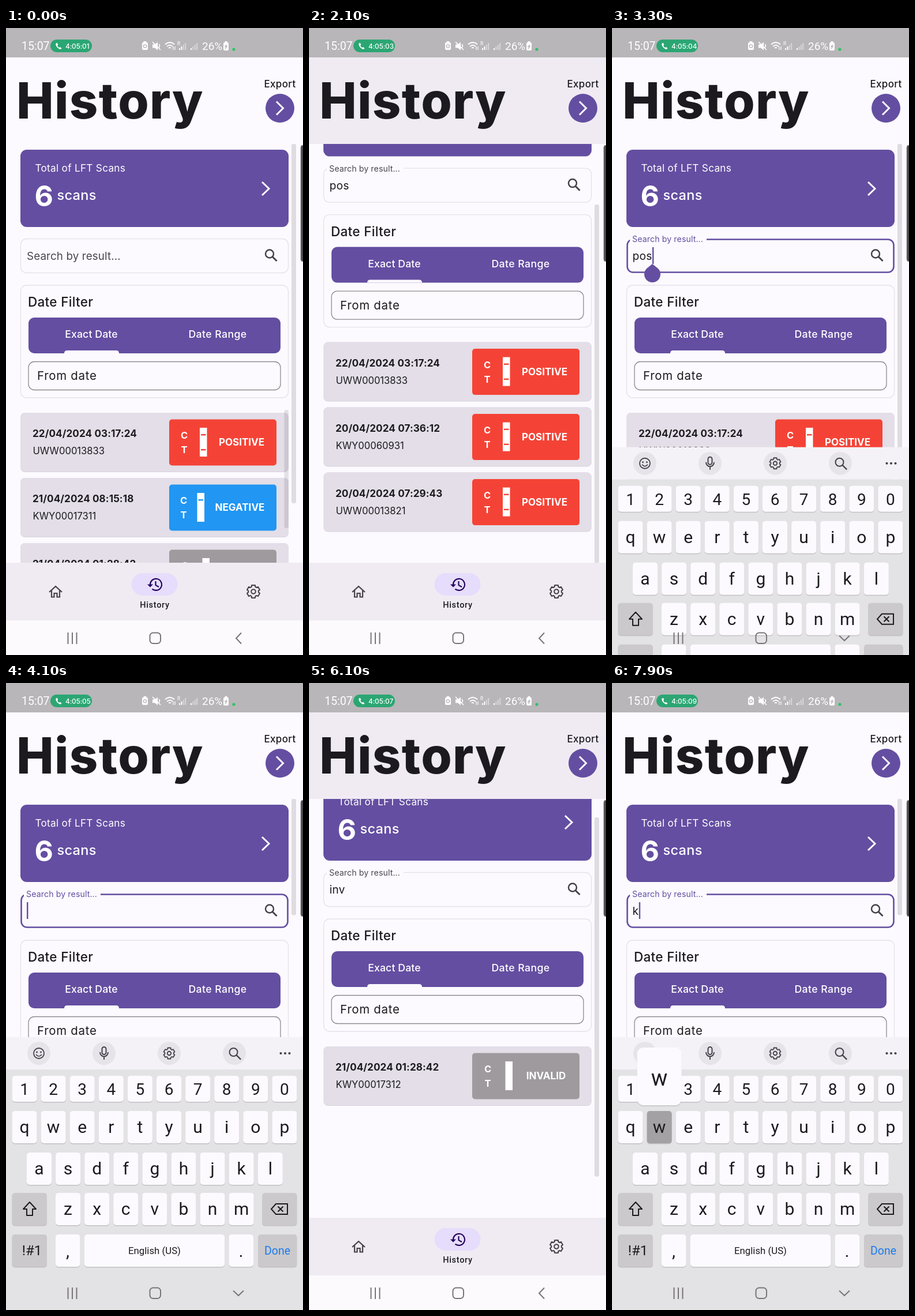
Recreate the animation shown at these times as an HTML page. Size 515 px wide and 1087 px high, loop 8 s.

```html
<!DOCTYPE html>
<html lang="en">
<head>
<meta charset="utf-8">
<title>Scan history</title>
<style>
html, body { margin: 0; width: 100%; height: 100%; overflow: hidden; background: #fdfaff; }
svg { display: block; width: 100vw; height: 100vh; }
text { font-family: Inter, "Open Sans", sans-serif; fill: #1c1a1f; white-space: pre; }
.rb { font-family: Roboto, Arial, sans-serif; }
.m { text-anchor: middle; }
.w { fill: #fff; }
.b { font-weight: 700; }
.med { font-weight: 500; }
.ln { fill: none; stroke-linecap: butt; stroke-linejoin: miter; }
</style>
</head>
<body>
<svg id="stage" viewBox="0 0 515 1087" preserveAspectRatio="none"></svg>
<script>
const LOOP = 8000, PURPLE = '#644ea1', BG = '#fdfaff', INK = '#45414a';
const KB_TOP = 614, KB_TRAVEL = 473, VIEW_TOP = 201, VIEW_END = 927, CONTENT = 846;

// markup helpers
const rect = (x, y, w, h, r, fill, extra = '') =>
  `<rect x="${x}" y="${y}" width="${w}" height="${h}" rx="${r}" fill="${fill}" ${extra}/>`;
const circle = (x, y, r, fill, extra = '') => `<circle cx="${x}" cy="${y}" r="${r}" fill="${fill}" ${extra}/>`;
const line = (d, color, w, extra = '') => `<path class="ln" d="${d}" stroke="${color}" stroke-width="${w}" ${extra}/>`;
const text = (s, x, y, size, cls = '', ls = 0, extra = '') =>
  `<text x="${x}" y="${y}" font-size="${size}" letter-spacing="${ls}" class="${cls}" ${extra}>${s}</text>`;

function gear(cx, cy, r, w) {
  const pts = [];
  for (let i = 0; i < 6; i++) {
    for (const [da, k] of [[-15, 1], [15, 1], [22, .78], [38, .78]]) {
      const a = (i * 60 - 90 + da) * Math.PI / 180;
      pts.push((cx + r * k * Math.cos(a)).toFixed(1) + ' ' + (cy + r * k * Math.sin(a)).toFixed(1));
    }
  }
  return line('M' + pts.join('L') + 'Z', INK, w, 'style="stroke-linejoin:round"') +
    circle(cx, cy, r * .33, 'none', `stroke="${INK}" stroke-width="${w}"`);
}

const magnifier = (x, y, r, w) => circle(x, y, r, 'none', `stroke="${INK}" stroke-width="${w}"`) +
  line(`M${x + r * .7} ${y + r * .7}L${x + r * 1.8} ${y + r * 1.8}`, INK, w * 1.15);

// result cards
const KINDS = {
  POSITIVE: { fill: '#f44336', strip: 336, c: 309, label: 408.5, marks: [704, 730] },
  NEGATIVE: { fill: '#2196f3', strip: 331.5, c: 308, label: 405.5, marks: [704] },
  INVALID: { fill: '#9e9a9e', strip: 340.5, c: 310, label: 411, marks: [] }
};
const SCANS = [
  ['22/04/2024 03:17:24', 'UWW00013833', 'POSITIVE'],
  ['21/04/2024 08:15:18', 'KWY00017311', 'NEGATIVE'],
  ['21/04/2024 01:28:42', 'KWY00017312', 'INVALID'],
  ['20/04/2024 07:36:12', 'KWY00060931', 'POSITIVE'],
  ['20/04/2024 07:29:43', 'UWW00013821', 'POSITIVE']
];

// every card is drawn in the first slot and moved down to its row later
function card([date, id, kind]) {
  const k = KINDS[kind];
  return '<g class="card">' +
    rect(25, 667, 465, 103, 8, '#d8d3dc') + rect(25, 667, 465, 102, 8, '#e3dee7') +
    text(date, 46, 709, 17.1, 'b', .1) + text(id, 46.5, 739, 16.6) +
    rect(283, 678.5, 186, 80, 5, k.fill) +
    text('C', k.c, 712, 16.5, 'b w m') + text('T', k.c, 737, 16.5, 'b w m') +
    rect(k.strip, 693, 12.5, 50, 0, '#fff') +
    k.marks.map(y => rect(k.strip + 2, y, 8.5, 2.4, 0, k.fill)).join('') +
    text(kind, k.label, 724, 17, 'b w m') + '</g>';
}

// keyboard
const ROWS = [['1234567890', 10.5, 681, 45, 28, 33], ['qwertyuiop', 10.5, 742, 56, 30, 38],
  ['asdfghjkl', 36, 814, 56, 30, 38], ['zxcvbnm', 86, 884, 56, 30, 38]];
const keys = {};

function key(name, x, y, w, h, label, fill = BG) {
  keys[name] = { x, y, w, h, fill };
  return rect(x, y + 1.5, w, h, 5, '#c3c1c5') + rect(x, y, w, h, 5, fill, `id="key-${name}"`) + label;
}

function letterRow([chars, x0, y, h, size, base]) {
  return [...chars].map((c, i) => {
    const x = x0 + 50.1 * i;
    return key(c, x, y, 43, h, text(c, x + 21.5, y + base, size, 'rb m'));
  }).join('');
}

const face = (id, inner) => `<g id="face-${id}">${circle(57, 642, 9, 'none', `stroke="${INK}" stroke-width="1.8"`)}${inner}</g>`;
const heart = x => `<path d="M${x} 644l-3.6-3.6a2 2 0 0 1 3.6-2a2 2 0 0 1 3.6 2z" fill="${INK}"/>`;

function keyboard() {
  const grey = '#cbc9cc';
  return rect(0, KB_TOP, 515, 56, 0, '#f4f2f6') + rect(0, 670, 515, 900, 0, '#e3e2e5') +
    [57, 170, 283, 396].map(x => circle(x, 642, 20, '#e6e4e8')).join('') +
    face('smile', circle(53.5, 640, 1.4, INK) + circle(60.5, 640, 1.4, INK) + line('M52 644q5 6 10 0', INK, 1.7)) +
    face('love', heart(53) + heart(61) + circle(57, 647, 1.8, INK)) +
    face('sad', line('M51.5 638l4 2M62.5 638l-4 2', INK, 1.5) + circle(53.5, 641.5, 1.4, INK) +
      circle(60.5, 641.5, 1.4, INK) + line('M53 647.5q4-5 8 0', INK, 1.6)) +
    rect(166.5, 631, 7, 13, 3.5, 'none', `stroke="${INK}" stroke-width="2"`) +
    line('M163 640a7 7.5 0 0 0 14 0M170 647.5V653', INK, 2) +
    gear(283, 642, 9.8, 1.8) + magnifier(394.5, 640, 7, 2) +
    [476.5, 484, 491.5].map(x => circle(x, 642, 2.1, INK)).join('') +
    ROWS.map(letterRow).join('') +
    key('shift', 10.5, 884, 60.5, 56, line('M41 900L52 912H46V923H36V912H30Z', '#1c1a1f', 2, 'style="stroke-linejoin:round"'), grey) +
    key('del', 444, 884, 60.5, 56, line('M468 903H488V921H468L460 912ZM471.5 907.5L480.5 916.5M480.5 907.5L471.5 916.5', '#1c1a1f', 2), grey) +
    key('sym', 10.5, 956, 60.5, 56, text('!#1', 45, 992, 24, 'rb m'), grey) +
    key('comma', 86, 956, 42.5, 56, text(',', 107, 995, 30, 'rb m')) +
    key('space', 136, 956, 243, 56, text('English (US)', 257.5, 990, 16.8, 'rb m')) +
    key('dot', 386.5, 956, 42.5, 56, text('.', 407.5, 995, 30, 'rb m')) +
    key('done', 437, 956, 67.5, 56, text('Done', 470.5, 991, 19.5, 'rb m', 0, 'style="fill:#1b7bee"'), grey) +
    `<g id="popup">${rect(0, 2, 77, 100, 11, '#000', 'opacity=".1"')}${rect(0, 0, 77, 100, 11, BG)}` +
    text('', 38.5, 66, 38, 'rb m', 0, 'id="popChar"') + '</g>';
}

const statusBar = () => rect(0, 0, 515, 51, 0, '#b8b6b8') +
  text('15:07', 27, 38, 19.5, 'rb w', 0) + rect(77, 20, 72, 22, 11, '#2ba673') +
  '<path d="M87 26.500q-1.500 1.500 0 4.500q2 4 5.500 5.500q2.500 1 4-1l-2.500-2.500l-2 1q-2-1-3-3.500l1.300-1.800l-1.800-3z" fill="#fff"/>' +
  text('', 103, 35.500, 11.800, 'w med', -.1, 'id="clock"') +
  rect(236, 25, 10, 13, 2, '#fff') + rect(238.5, 23, 5, 3, 0, '#fff') +
  circle(241, 31.5, 2.6, 'none', 'stroke="#b8b6b8" stroke-width="1.4"') +
  '<path d="M254 28.500h4l5-4v14l-5-4h-4z" fill="#fff"/>' +
  line('M254 24L268 38M265 28q3 3 0 6', '#fff', 1.6) +
  line('M276 28.500q8-7 16 0M279 32q5-4.500 10 0M282 35q2-2 4 0', '#fff', 1.7) +
  line('M290 38V32M293 38V32', '#fff', 1.2) + text('R', 297, 30, 8.5, 'rb w') +
  [0, 1, 2, 3].map(i => rect(300 + i * 3.4, 35 - i * 3, 2, 3 + i * 3, 0, '#fff', i > 1 ? 'opacity=".45"' : '') +
    rect(320 + i * 3.4, 35 - i * 3, 2, 3 + i * 3, 0, '#fff', i ? 'opacity=".45"' : '')).join('') +
  text('26%', 340, 38, 19, 'rb w') +
  rect(377, 25, 9, 14, 2, '#fff') + rect(379.5, 23, 4, 3, 0, '#fff') + line('M383 29l-3 3h3l-3 4', '#b8b6b8', 1.3) +
  circle(395, 37, 2.6, '#2fc268');

const content = () => `<g clip-path="url(#view)"><g id="scroll">` +
  rect(25, 211, 465, 134, 11, PURPLE) +
  text('Total of LFT Scans', 50.5, 249, 17.2, 'w', .28) +
  text('6', 49.5, 309, 50, 'b w') + text('scans', 88.5, 298, 23.5, 'w med', .3) +
  line('M444 267L456 278.500L444 290', '#fff', 3) +
  rect(25.5, 365.5, 464, 59, 10, 'none', 'id="field"') +
  rect(31, 360, 0, 14, 0, BG, 'id="gap"') +
  text('Search by result...', 0, 0, 18.8, '', .12, 'id="label"') +
  text('', 35.5, 402, 19.2, '', .2, 'id="query"') +
  rect(0, 380, 2.4, 29, 0, PURPLE, 'id="caret"') +
  magnifier(457, 391.5, 7, 2.5) +
  rect(25.5, 446, 464, 195, 10, 'none', 'stroke="#e5e1e9" stroke-width="1.3"') +
  text('Date Filter', 38, 483, 22.5, 'med', .3) +
  rect(39, 502, 437, 62, 10, PURPLE) +
  text('Exact Date', 148, 537, 17.7, 'w m med', .1) + text('Date Range', 367, 537, 17.7, 'w m med', .4) +
  `<path d="M101 564v0q0-5 5-5h85q5 0 5 5z" fill="${BG}"/>` +
  rect(39, 578.5, 437, 49, 10, 'none', 'stroke="#8d8a90" stroke-width="1.3"') +
  text('From date', 54, 610, 20.4, '', .75) +
  SCANS.map(card).join('') +
  rect(482.5, 662, 7.5, 205, 3, '#000', 'id="innerBar" opacity=".1"') +
  `<path id="handle" d="M0-4L9.900 4.100A14 14 0 1 1-9.900 4.100Z" fill="${PURPLE}"/>` +
  '</g>' + rect(495, 201, 8, 10, 3, '#dfdce1', 'id="bar"') + '</g>';

const header = () => rect(0, 51, 515, 150, 0, BG) + rect(0, 51, 515, 150, 0, '#f0ebf3', 'id="tint"') +
  text('History', 18, 157, 86.5, '', 1.3, 'font-weight="800"') +
  text('Export', 475, 102.5, 17, 'm med', .35) +
  circle(475, 139, 25, PURPLE) + line('M469 127.500L480.500 139L469 150.500', '#fff', 3);

const bottomNav = () => rect(0, 927, 515, 100, 0, '#f0ebf3') + rect(0, 1027, 515, 60, 0, '#fcfafd') +
  line('M75 978L86 968L97 978M79 975V986.500H83.500V980H88.500V986.500H93V975', INK, 2.2) +
  rect(217.5, 945, 80, 39, 19.5, '#e6dcfb') +
  line('M250 965.500A10 10 0 1 1 253.500 972.500M259.500 959V966L265 969', '#22005d', 2.1) +
  '<path d="M245 964.500h10l-5 5z" fill="#22005d"/>' +
  text('History', 258, 1004.5, 14.5, 'rb m med', .7) + gear(429, 977, 11.4, 2.1);

const systemNav = () => rect(0, 1027, 0, 60, 30, '#000', 'id="ripple"') +
  line('M107.500 1048V1068M115 1048V1068M122.500 1048V1068', '#77757a', 2) +
  rect(249.5, 1048.5, 18.5, 18.5, 5.5, 'none', 'stroke="#77757a" stroke-width="2"') +
  line('M408 1048.500L399 1058L408 1067.500', '#77757a', 2, 'id="back"') +
  line('M394 1053.500L403 1062L412 1053.500', '#77757a', 2, 'id="down"');

const stage = document.getElementById('stage');
stage.innerHTML = `<defs><clipPath id="view"><rect y="${VIEW_TOP}" width="515" height="${VIEW_END - VIEW_TOP}"/></clipPath></defs>` +
  rect(0, 0, 515, 1087, 0, BG) + content() + header() + statusBar() + bottomNav() +
  `<g id="kb">${keyboard()}</g>` + systemNav() +
  rect(511, 203, 10, 202, 4, '#4b494c', 'stroke="#a09ea2" stroke-width="1"');

const el = {};
stage.querySelectorAll('[id]').forEach(n => el[n.id] = n);
const cards = [...stage.querySelectorAll('.card')];

// timeline
const FOCUS = [[200, 1550], [3100, 5110], [6700, LOOP + 1]];
const KB_UP = [287, 3187, 6787], KB_DOWN = [1550, 5110], BACK = [1310, 4870];
const PRESSES = [[700, 'p'], [900, 'o'], [1120, 's'],
  [3550, 'del'], [3700, 'del'], [3850, 'del'], [4150, 'i'], [4400, 'n'], [4650, 'v'],
  [7100, 'del'], [7240, 'del'], [7380, 'del'], [7570, 'k'], [7840, 'w']];
const HANDLE = [[3180, 3640], [6780, 7190]];
const SCROLL = [[0, 0], [1820, 0], [2080, 122.4], [2350, 122.4], [2780, 0],
  [5720, 0], [6000, 37], [6150, 37], [6420, 0], [LOOP, 0]];
const HOLD = 110;

const ramp = (t, a, b) => Math.min(1, Math.max(0, (t - a) / (b - a)));
const easeOut = p => 1 - (1 - p) ** 3;
const smooth = p => p * p * (3 - 2 * p);
const within = (t, spans) => spans.some(([a, b]) => t >= a && t < b);
const sum = (list, f) => list.reduce((s, v) => s + f(v), 0);
const set = (n, attrs) => { for (const k in attrs) n.setAttribute(k, attrs[k]); };
const show = (n, on) => { n.style.display = on ? '' : 'none'; };

function scrollAt(t) {
  const i = SCROLL.findIndex(([time]) => time > t);
  const [a, va] = SCROLL[i - 1], [b, vb] = SCROLL[i];
  return va + (vb - va) * smooth(ramp(t, a, b));
}

const queryAt = t => PRESSES.filter(([a]) => a + HOLD - 20 <= t)
  .reduce((s, [, k]) => k === 'del' ? s.slice(0, -1) : s + k, '');

function drawList(query) {
  let row = 0;
  cards.forEach((c, i) => {
    const on = SCANS[i][2].toLowerCase().startsWith(query);
    show(c, on);
    if (on) set(c, { transform: `translate(0 ${113 * row++})` });
  });
  show(el.innerBar, !query);
}

function drawField(t, query) {
  const focused = within(t, FOCUS), lift = easeOut(ramp(t, 200, 370));
  const inset = focused ? 1 : 0;
  set(el.field, {
    x: 25.5 + inset, y: 365.5 + inset, width: 464 - 2 * inset, height: 59 - 2 * inset,
    stroke: focused ? PURPLE : '#e5e1e9', 'stroke-width': focused ? 2.6 : 1.3
  });
  set(el.gap, { width: 133 * lift });
  set(el.label, { transform: `translate(${36 - lift} ${402 - 31 * lift}) scale(${1 - .245 * lift})` });
  el.label.style.fill = focused ? PURPLE : '#49454f';
  el.query.textContent = query;
  const end = 36 + (query ? el.query.getComputedTextLength() : 0);
  set(el.caret, { x: end });
  show(el.caret, focused);
  set(el.handle, { transform: `translate(${end} 413)` });
  show(el.handle, within(t, HANDLE));
}

function drawKeys(t, query) {
  for (const k in keys) set(el['key-' + k], { fill: keys[k].fill });
  const hit = PRESSES.find(([a]) => t >= a && t < a + HOLD);
  const popped = hit && hit[1] !== 'del';
  show(el.popup, popped);
  if (hit) set(el['key-' + hit[1]], { fill: '#a3a1a4' });
  if (popped) {
    const k = keys[hit[1]];
    set(el.popup, { transform: `translate(${Math.max(2, Math.min(436, k.x + k.w / 2 - 38.5))} ${k.y - 110})` });
    el.popChar.textContent = hit[1];
  }
  const mood = !within(t, HANDLE) && { pos: 'love', inv: 'sad' }[query] || 'smile';
  for (const m of ['smile', 'love', 'sad']) show(el['face-' + m], m === mood);
}

function drawSystemNav(t) {
  const start = BACK.find(a => t >= a && t < a + 520);
  show(el.ripple, start !== undefined);
  if (start !== undefined) {
    const w = 133 * ramp(t, start, start + 230);
    set(el.ripple, { x: 401.5 - w / 2, width: w, rx: Math.min(30, w / 2), opacity: .1 * (1 - ramp(t, start + 270, start + 520)) });
  }
  const hides = KB_UP.some((a, i) => t >= a && t < (BACK[i] + 200 || LOOP));
  show(el.down, hides);
  show(el.back, !hides);
}

function draw(t) {
  const query = queryAt(t), y = scrollAt(t);
  const open = sum(KB_UP, a => easeOut(ramp(t, a, a + 300))) - sum(KB_DOWN, a => smooth(ramp(t, a, a + 250)));
  // the page is resized only once the keyboard has settled
  const h = (open > .995 ? KB_TOP : VIEW_END) - VIEW_TOP;

  set(el.kb, { transform: `translate(0 ${KB_TRAVEL * (1 - open)})` });
  show(el.kb, open > .001);
  set(el.scroll, { transform: `translate(0 ${-y})` });
  set(el.bar, { y: VIEW_TOP + y * h / CONTENT, height: h * h / CONTENT });
  set(el.tint, { opacity: Math.min(1, y / 15) });
  el.clock.textContent = '4:05:0' + (1 + Math.floor((t + 120) / 1000));

  drawList(query);
  drawField(t, query);
  drawKeys(t, query);
  drawSystemNav(t);
}

const origin = performance.now();
function tick() {
  draw((performance.now() - origin) % LOOP);
  requestAnimationFrame(tick);
}
tick();
</script>
</body>
</html>
```
